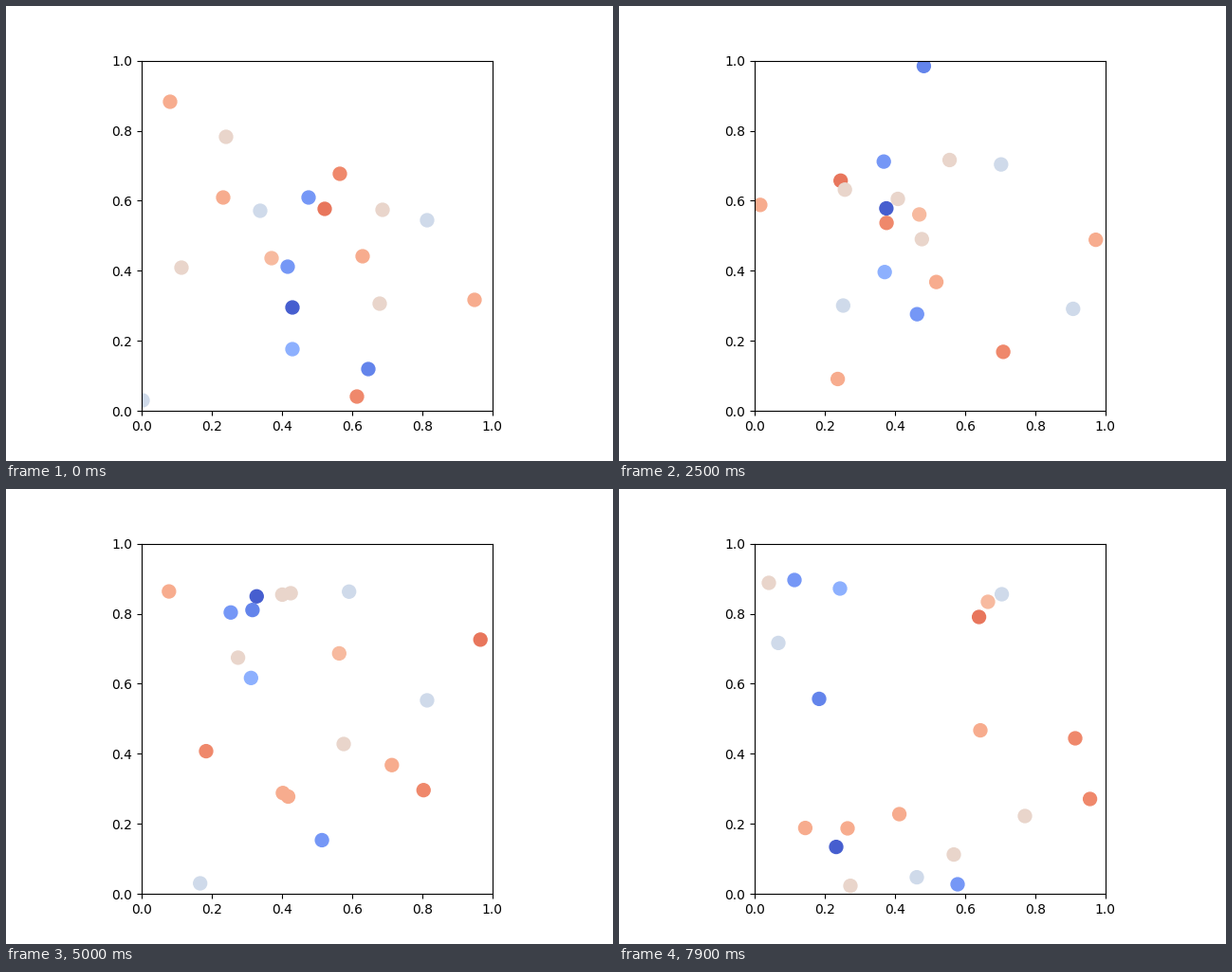
Write a matplotlib script that moves like this. It is 640 by 480 pixels and loops after 8000 ms.

```python
import numpy as np
import matplotlib.pyplot as plt
from matplotlib.animation import FuncAnimation

FRAMES, INTERVAL = 80, 100
LEFT, BOTTOM, SIDE = 143.2, 427.2, 369.6   # plot square in stage pixels

# Unwrapped paths per colour: points evenly spaced in time, later on top.
# Two points drift straight, more of them bend the path.
WARM = {
    .83: [[(336, 214), (174, 169), (10, 135)]],
    .79: [[(352, 177), (241, 257), (127, 327)], [(370, 412), (481, 263)]],
    .70: [[(173, 101), (234, 20), (305, -52), (381, -115)],
          [(229, 202), (-74, 343)],
          [(376, 264), (310, 308), (241, 358)],
          [(494, 310), (532, 151), (566, -12)]],
    .66: [[(280, 266), (337, 193), (389, 119)]],
}
NEUTRAL = {
    .55: [[(232, 138), (428, 345)], [(185, 276), (353, 16)],
          [(397, 215), (244, 49)], [(394, 314), (158, 99)]],
    .45: [[(268, 216), (168, 532)], [(444, 226), (314, 40)],
          [(144, 416), (34, 111)]],
}
COOL = {
    .25: [[(302, 362), (233, 105)]],
    .18: [[(319, 202), (255, 144), (185, 96)],
          [(297, 275), (325, 352), (357, 417)]],
    .13: [[(382, 383), (318, 436), (254, 505), (211, 591)]],
    .04: [[(302, 318), (281, 208), (262, 103), (229, 8)]],
}


def drift(points, t):
    """Polynomial through the points, one row per time."""
    knots = np.linspace(t[0], t[-1], len(points))
    fit = np.polyfit(knots, points, len(points) - 1)
    return np.stack([np.polyval(c, t) for c in fit.T], axis=1)


times = np.arange(FRAMES)
levels, tracks = [], []
for group in (WARM, NEUTRAL, COOL):
    for level, paths in group.items():
        for path in paths:
            levels.append(level)
            tracks.append(drift(path, times))
tracks = np.stack(tracks, axis=1)
tracks = (tracks - (LEFT, BOTTOM)) / (SIDE, -SIDE) % 1

fig, ax = plt.subplots(figsize=(6.4, 4.8), dpi=100)
ax.set(xlim=(0, 1), ylim=(0, 1), aspect="equal")
dots = ax.scatter(*tracks[0].T, s=100, c=levels, cmap="coolwarm", vmin=0, vmax=1)


def update(frame):
    dots.set_offsets(tracks[frame])
    return dots,


anim = FuncAnimation(fig, update, frames=FRAMES, interval=INTERVAL,
                     repeat=True, repeat_delay=0)
plt.show()
```
